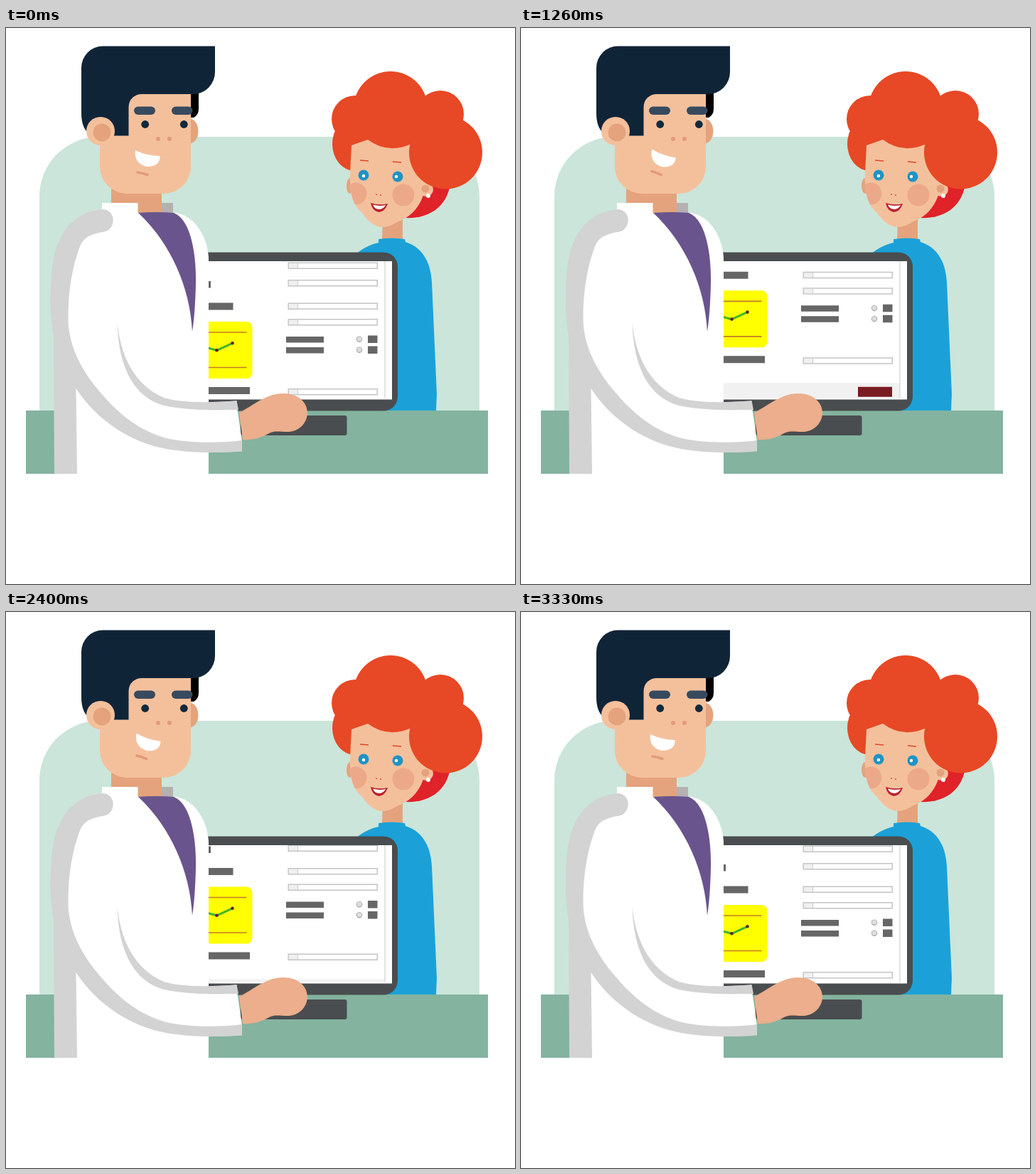
These frames come from a looping animation (716x782 px, 6460 ms). An HTML page with a canvas:

```html
<!DOCTYPE html>
<html lang="en">
<head>
<meta charset="utf-8">
<title>At the consultation desk</title>
<style>
  html, body { margin: 0; width: 100%; height: 100%; overflow: hidden; background: #fff; }
  canvas { display: block; width: 716px; height: 782px; }
</style>
</head>
<body>
<canvas id="stage" width="716" height="782"></canvas>
<script>
const ctx = document.getElementById('stage').getContext('2d');
const LOOP = 6460, STEP = 30;
const SKIN = '#f4c09c', SHADE = '#e4a37c', ORANGE = '#e74825', GREY = '#d3d3d3', BAR = '#666', METAL = '#4a4d4f';

const fill = (color, d) => {
  ctx.fillStyle = color;
  ctx.fill(new Path2D(d));
};
const line = (color, width, d) => {
  ctx.strokeStyle = color;
  ctx.lineWidth = width;
  ctx.stroke(new Path2D(d));
};
const disc = (color, x, y, rx, ry = rx) => {
  ctx.fillStyle = color;
  ctx.beginPath();
  ctx.ellipse(x, y, rx, ry, 0, 0, Math.PI * 2);
  ctx.fill();
};
const box = (color, x, y, w, h, r = 0) => {
  ctx.fillStyle = color;
  ctx.beginPath();
  ctx.roundRect(x, y, w, h, r);
  ctx.fill();
};
const lerp = (a, b, k) => a + (b - a) * Math.min(1, Math.max(0, k));

function scrollAt(t) {
  return t < 1500 ? lerp(0, 52, t / 1500) : lerp(52, 1, (t - 1500) / 1800);
}

function mouthTilt(t) {
  const peak = 1680, most = 8.5 * Math.PI / 180;
  return most * Math.max(0, 1 - Math.abs(t - peak) / (peak - 15));
}

function drawRoom() {
  box('#fff', 0, 0, 716, 782);
  box('#cbe5da', 47, 153, 619, 386, [84, 84, 0, 0]);
}

function drawWoman() {
  fill('#e02229', 'M560 267C597 269 624 250 626 210L560 205Z');
  disc(ORANGE, 541, 113, 52);
  disc(ORANGE, 491, 128, 33);
  disc(ORANGE, 490, 163, 31, 38);
  disc(ORANGE, 611, 121, 33);
  fill(ORANGE, 'M480 120H620L600 190H490Z');

  fill(SHADE, 'M530 265L558 260V300H529Z');
  disc(SHADE, 484, 222, 5, 11);
  const face = 'M486 165L509 157Q537 178 570 163L592 205C592 240 575 262 557 270' +
    'C546 274 542 280 529 280C514 279 506 266 499 258C488 248 483 232 484 205Z';
  fill(SKIN, face);
  disc(SKIN, 591, 227, 10);
  disc(SHADE, 590, 226, 5.5);
  disc('#fff', 594, 236, 3);

  ctx.save();
  ctx.clip(new Path2D(face));
  disc('#eba98a', 492, 233, 15.5);
  disc('#eba98a', 559, 235, 15.5);
  ctx.restore();

  disc('#2093c4', 503, 207, 7.5);
  disc('#fff', 503, 208, 2.2);
  disc('#2093c4', 551, 209, 7.5);
  disc('#fff', 549, 209, 2.2);
  line('#df4528', 1.6, 'M498 186L510 187M544 188L556 189');
  disc('#d8502f', 521, 234, 1);
  disc('#d8502f', 527, 235, 1);
  fill('#bd202b', 'M513 246Q525 250 537 247Q533 259 524 259Q515 257 513 246Z');
  fill('#fff', 'M516 248.5Q525 251 534 249Q531 255 524 255Q518 254 516 248.5Z');
  disc(ORANGE, 618.5, 175, 51.5);

  fill('#1ba1d8', 'M485 325C497 312 510 305 524 302V297Q543 294 561 297L562 301' +
    'C588 309 598 333 599 358L606 515L605 538H500Z');
}

function drawPage(scroll) {
  const field = y => {
    box('#c4c4c4', 396.5, y, 126.5, 9.5);
    box('#fff', 398, y + 1.5, 123.5, 6.5);
    box('#c9c9c9', 397, y + 1, 14, 7.5);
    box('#f0f0f0', 398, y + 1.5, 12, 6.5);
  };
  const bar = (x, y, w, h) => box(BAR, x, y, w, h);

  ctx.save();
  ctx.beginPath();
  ctx.rect(280, 328, 263, 192.5);
  ctx.clip();
  ctx.translate(0, -scroll);

  [329.5, 354, 386.5, 409, 507].forEach(field);
  bar(280, 356, 8, 9.5);
  bar(280, 386.5, 39.5, 10);
  bar(280, 505, 63, 10);
  for (const y of [434, 449]) {
    bar(394, y, 53, 8.5);
    bar(509, y - 1.5, 13.5, 10.5);
    disc('#a8a8a8', 497, y + 3.7, 4.2);
    disc('#dedede', 497, y + 3.4, 3.2);
  }

  box('#ffff00', 260, 413, 86.5, 80, 8);
  line('#c5792b', 1.7, 'M270 428H338.5M270 477.5H338.5');
  line('#42b52c', 3, 'M280 449L296.5 453.3L318.5 443.3');
  disc('#65231f', 296.5, 453.3, 2.3);
  disc('#65231f', 318.5, 443.3, 2.3);

  box('#f1f1f1', 280, 543, 253, 24);
  box('#7a1b22', 474, 548.5, 48, 14);
  line('#d6d6d6', 1.3, 'M533 300V567');
  ctx.restore();
}

function drawMonitor(scroll) {
  box('#84b39f', 28, 538, 650, 89);
  box(METAL, 330, 545, 149.5, 28, 3);
  box(METAL, 270, 315.5, 281, 223, [0, 20, 20, 0]);
  box('#fff', 270, 328, 273, 194.5);
  drawPage(scroll);
}

function drawCoat() {
  box(SHADE, 148, 220, 71, 42);
  box('#b5b0b1', 219, 246, 16, 16);
  fill('#fff', 'M135 246H185.5V260H240C268 266 283 295 285 322V627H84V330L110 285L135 270Z');
  fill('#6a548d', 'M186 260Q213 258 236 260C262 270 268 325 267 360Q266 402 262 427C259 365 232 303 186 260Z');

  // Right forearm, then the cuff and its shadows
  fill('#fff', 'M270 527L324 525L332 582L270 590Z');
  fill(GREY, 'M156.5 414C161 460 180 502 222 520C250 528 290 527 324.5 524L327 537' +
    'C300 537 260 539 222 531C182 520 158 480 156.5 414Z');
  fill(GREY, 'M137 255C90 258 66 297 64 350C61 380 63 410 67 435L68 627H100L98.5 507' +
    'C130 555 178 583 225 592C260 598 300 598 332 595.5V580C300 584 265 584 230 578' +
    'C180 566 150 533 128 507C108 482 92 455 88 420C86 380 92 340 103 310' +
    'C108 295 118 290 136 287C155 285 156 257 137 255Z');
  fill('#ecae8c', 'M328 541C345 533 365 514 390 514C412 514 424 527 424 542C423 558 410 568 396 568' +
    'C385 568 378 566 370 570C358 577 345 580 333 579Z');
}

function drawDoctorHead(tilt) {
  fill('#000', 'M255 88H271V114Q271 122 264 126H255Z');
  fill(SHADE, 'M258 127Q270 130 270.5 145Q270 160 258 163Z');
  box(SKIN, 132, 92, 128, 141, [0, 0, 38, 38]);
  fill('#102437', 'M106 56A30.5 30.5 0 0 1 136.5 25.5H294V62A31 31 0 0 1 263 93H191' +
    'A18 18 0 0 0 172.5 111V151.5H122C111 147 106 136 106 120Z');
  disc(SKIN, 133, 145, 20);
  disc(SHADE, 135, 147, 12.5);

  box('#384a5e', 180, 110.5, 30, 11.5, 5.75);
  box('#384a5e', 233, 110.5, 29.5, 11.5, 5.75);
  disc('#12293c', 195.7, 135.5, 5.4);
  disc('#12293c', 250.3, 135.5, 5.4);
  disc('#e49a78', 214, 156, 3);
  disc('#e49a78', 230, 156, 3);

  ctx.save();
  ctx.translate(197, 192);
  ctx.rotate(tilt);
  ctx.translate(-197, -192);
  fill('#fff', 'M182 172Q199 180 216.5 180C217 190 210 195 199 195C187 193 180 184 182 172Z');
  ctx.lineCap = 'round';
  line('#e49a78', 3.6, 'M185 203Q192 204 199 206.5');
  ctx.restore();
}

function render(now) {
  const t = Math.floor(now % LOOP / STEP) * STEP;
  drawRoom();
  drawWoman();
  drawMonitor(scrollAt(t));
  drawCoat();
  drawDoctorHead(mouthTilt(t));
}

const start = performance.now();
function tick() {
  render(performance.now() - start);
  requestAnimationFrame(tick);
}
tick();
</script>
</body>
</html>
```
